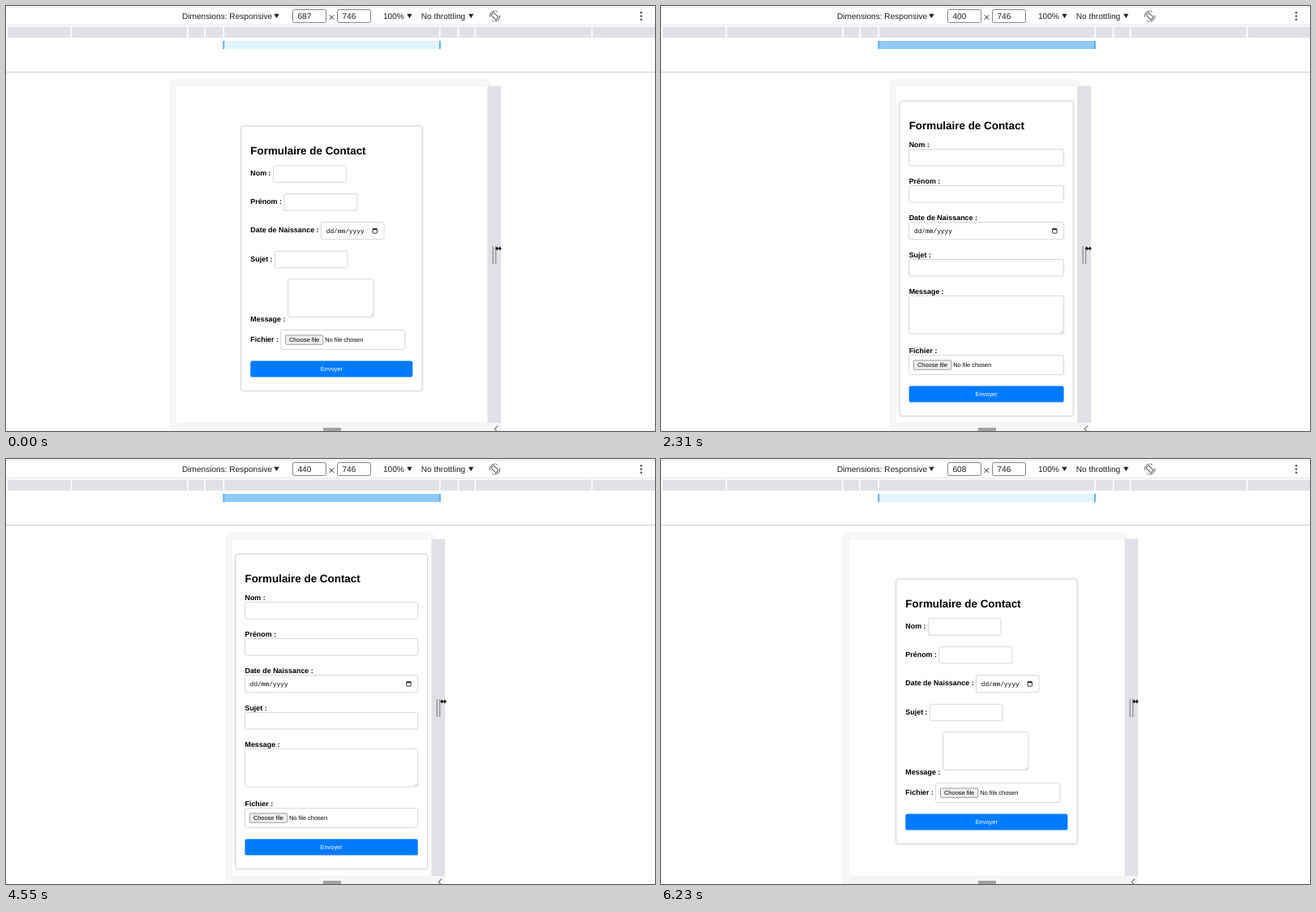
Animation, 800 px wide and 524 px high, one loop 6.3 s. Source, as an HTML page:

```html
<!DOCTYPE html>
<html lang="fr">
<head>
<meta charset="utf-8">
<title>Formulaire de Contact</title>
<style>
  html, body { margin: 0; width: 100%; height: 100%; overflow: hidden; background: #fff; }
  svg { display: block; width: 800px; height: 524px; background: #fff;
        font: 7.45px "Liberation Sans", Arial, sans-serif; text-rendering: geometricPrecision; }
  .bar { font-size: 10.1px; fill: #1f1f1f; }
  .title { font-size: 13.42px; font-weight: bold; }
  .label { font-size: 8.94px; font-weight: bold; }
  .date { font: 7.83px "Liberation Mono", "Courier New", monospace; }
  .field { fill: #fff; stroke: #ccc; stroke-width: .8; }
  .card { fill: #fff; stroke: #ccc; stroke-width: .8; filter: drop-shadow(0 0 1.5px rgba(0,0,0,.12)); }
  .send { fill: #007bff; }
  .line { fill: none; stroke: #555; }
</style>
</head>
<body>
<svg viewBox="0 0 800 524">
  <g id="toolbar"></g>
  <g id="device"></g>
  <g id="form"></g>
  <g id="cursor">
    <path d="M-4 0l2.8-2.8v1.9h2.4v-1.9L4 0 1.2 2.8V.9h-2.4v1.9z" fill="#000" stroke="#fff" stroke-width=".6" paint-order="stroke"/>
  </g>
</svg>
<script>
const LOOP = 6300, STEP = 70;
const SCALE = 0.5592, MID = 401.2, BREAKPOINT = 480;

// time, viewport width, how far the pointer is ahead of it
const KEYS = [
  [0, 687, 0], [1120, 469, -5], [2310, 400, 0], [3290, 359, 0],
  [4550, 440, 2], [4970, 486, 0], [6230, 608, 0]
];

const $ = id => document.getElementById(id);
const rect = (x, y, x2, y2, attrs = '') =>
  `<rect x="${x}" y="${y}" width="${x2 - x}" height="${y2 - y}" ${attrs}/>`;
const fill = (x, y, x2, y2, color) => rect(x, y, x2, y2, `fill="${color}"`);
const text = (x, y, str, attrs = '') => `<text x="${x}" y="${y}" ${attrs}>${str}</text>`;
const path = (d, attrs) => `<path d="${d}" ${attrs}/>`;

const slopes = KEYS.slice(1).map((k, i) => (k[1] - KEYS[i][1]) / (k[0] - KEYS[i][0]));
const tangents = KEYS.map((_, i) => {
  if (i === 0) return 0;
  if (i === slopes.length) return slopes[i - 1];
  const a = slopes[i - 1], b = slopes[i];
  return a * b > 0 ? 2 * a * b / (a + b) : 0;
});

// Monotone cubic for the width, straight line for the lead
function sample(t) {
  let i = 0;
  while (i < slopes.length - 1 && t >= KEYS[i + 1][0]) i++;
  const [t0, w0, lead0] = KEYS[i], [t1, w1, lead1] = KEYS[i + 1];
  const h = t1 - t0, u = Math.min(1, (t - t0) / h), v = 1 - u;
  const width = w0 * v * v * (1 + 2 * u) + w1 * u * u * (3 - 2 * u)
    + h * u * v * (tangents[i] * v - tangents[i + 1] * u);
  return { width, lead: lead0 * v + lead1 * u };
}

function toolbar(number, narrow) {
  const arrow = x => path(`M${x} 9.7h6.4l-3.2 5.2z`, 'fill="#222"');
  const box = x => rect(x, 4.5, x + 41, 20.5, 'rx="2" fill="#fff" stroke="#777" stroke-width=".9"');
  const bar = (x, str) => text(x, 16, str, 'class="bar"');
  const marks = [80.5, 224, 245, 268.3, 534.8, 557.5, 578.5, 722.3];
  const edge = narrow ? '#5eaaf0' : '#55a8e2';
  return fill(0, 1, 800, 2, '#e6e7ea')
    + bar(217, 'Dimensions: Responsive') + arrow(330.3)
    + box(353.5) + bar(359.5, number) + box(408.5) + bar(414.5, 746)
    + path('M398.6 11.2l5.6 5.6m0-5.6l-5.6 5.6', 'stroke="#222"')
    + bar(465, '100%') + arrow(494.2) + bar(511.7, 'No throttling') + arrow(570)
    + `<g class="line" transform="translate(602.5 12.5)">
        <rect x="-2.3" y="-4.2" width="4.6" height="8.4" rx="1" transform="rotate(-45)"/>
        <path d="M-6.3 1A6.3 6.3 0 0 1 0-6.3M6.3-1A6.3 6.3 0 0 1 0 6.3M1-7l2 2M-1 7l-2-2"/></g>`
    + [8.3, 12.5, 16.7].map(y => `<circle cx="783" cy="${y}" r="1.3" fill="#555"/>`).join('')
    + fill(0, 23, 800, 23.8, '#dcdde1')
    + fill(2, 25.5, 800, 39, '#dfe1e6')
    + marks.map(x => fill(x - .8, 25, x + .8, 39, '#fff')).join('')
    + fill(268, 43, 535.5, 53, narrow ? '#90caf9' : '#e1f5fe')
    + fill(267.4, 43, 269.2, 53, edge) + fill(534, 43, 535.8, 53, edge)
    + fill(0, 81, 800, 82, '#cbcdd0');
}

function device(left, right) {
  const end = right + 17;
  return rect(left - 8, 90, right + 5, 540, 'rx="8" fill="#f6f8f8"')
    + fill(left, 514, end, 524, '#f4f5f6')
    + fill(right, 98.5, end, 514, '#dfe1e6')
    + rect(left, 98.5, right, 514, 'fill="#fff" stroke="#eceeee" stroke-width=".6"')
    + fill(right + 6.3, 296, right + 7.8, 318, '#999')
    + fill(right + 9.7, 296, right + 11.2, 318, '#999')
    + fill(391, 520, 413, 524, '#a3a3a3')
    + path(`M${right + 13} 517.5l-4 4 3 3`, 'fill="none" stroke="#888" stroke-width="1.3"');
}

const field = (x, y, x2, y2) => rect(x, y, x2, y2, 'rx="2.4" class="field"');

function dateField(x, y, x2) {
  const icon = x2 - 14;
  return field(x, y, x2, y + 21.3) + text(x + 6.3, y + 13.4, 'dd/mm/yyyy', 'class="date"')
    + rect(icon, y + 8.2, icon + 5.4, y + 13.6, 'rx=".6" fill="none" stroke="#222" stroke-width=".9"')
    + fill(icon, y + 7.8, icon + 5.4, y + 9.6, '#222');
}

const area = (x, y, x2) => field(x, y, x2, y + 46.8)
  + path(`M${x2 - 4} ${y + 46}l3-3m-1.2 3l1.2-1.2`, 'stroke="#888" stroke-width=".5"');

const fileField = (x, y, x2) => field(x, y, x2, y + 24)
  + rect(x + 5.8, y + 6.3, x + 52.2, y + 17.7, 'rx="1.5" fill="#efefef" stroke="#777" stroke-width=".7"')
  + text(x + 10.3, y + 14.6, 'Choose file') + text(x + 54.5, y + 14.6, 'No file chosen');

const send = (x, y, x2) => rect(x, y, x2, y + 20, 'rx="2.6" class="send"')
  + text((x + x2) / 2, y + 12.5, 'Envoyer', 'fill="#fff" text-anchor="middle"');

function form(left, right, narrow) {
  const x1 = narrow ? left + 4.8 : 289.8, x2 = narrow ? right - 4.8 : 513;
  const a = x1 + 11.5, b = x2 - 11.7;
  const label = (y, str) => text(a, y, str + ' :', 'class="label"');
  const input = (x, y, end) => field(x, y, end, y + 20.5);
  const heading = y => text(a, y, 'Formulaire de Contact', 'class="title"');
  const card = (y, y2) => rect(x1, y, x2, y2, 'rx="3" class="card"');
  const labels = ys => ['Nom', 'Prénom', 'Date de Naissance', 'Sujet', 'Message', 'Fichier']
    .map((s, i) => label(ys[i], s)).join('');

  return narrow
    ? card(117.3, 505.5) + heading(151.8) + labels([173.8, 218.8, 263.8, 310, 355, 428])
      + input(a, 176.5, b) + input(a, 221.5, b) + dateField(a, 266.5, b)
      + input(a, 312.5, b) + area(a, 357.3, b) + fileField(a, 430.6, b) + send(a, 468.5, b)
    : card(148, 474.6) + heading(182.6) + labels([209.4, 244.3, 279.4, 314.6, 388.8, 413.8])
      + input(329.4, 196.8, 419.2) + input(342.8, 231.6, 433) + dateField(388.4, 266.5, 466)
      + input(331.5, 302.3, 421.2) + area(347.6, 336.7, 453) + fileField(338.7, 399.6, 491.8)
      + send(a, 437.5, b);
}

let shown = -1;
function tick(now) {
  const t = Math.floor((now % LOOP) / STEP) * STEP;
  if (t !== shown) {
    shown = t;
    const { width, lead } = sample(t);
    const half = width * SCALE / 2, left = MID - half, right = MID + half;
    const narrow = width <= BREAKPOINT;
    const number = Math.round(width + (lead < 0 ? lead : 0));
    $('toolbar').innerHTML = toolbar(number, narrow);
    $('device').innerHTML = device(left, right);
    $('form').innerHTML = form(left, right, narrow);
    $('cursor').setAttribute('transform', `translate(${right + 13.7 + lead * SCALE} 299)`);
  }
  requestAnimationFrame(now => tick(now - start));
}
const start = performance.now();
tick(0);
</script>
</body>
</html>
```
